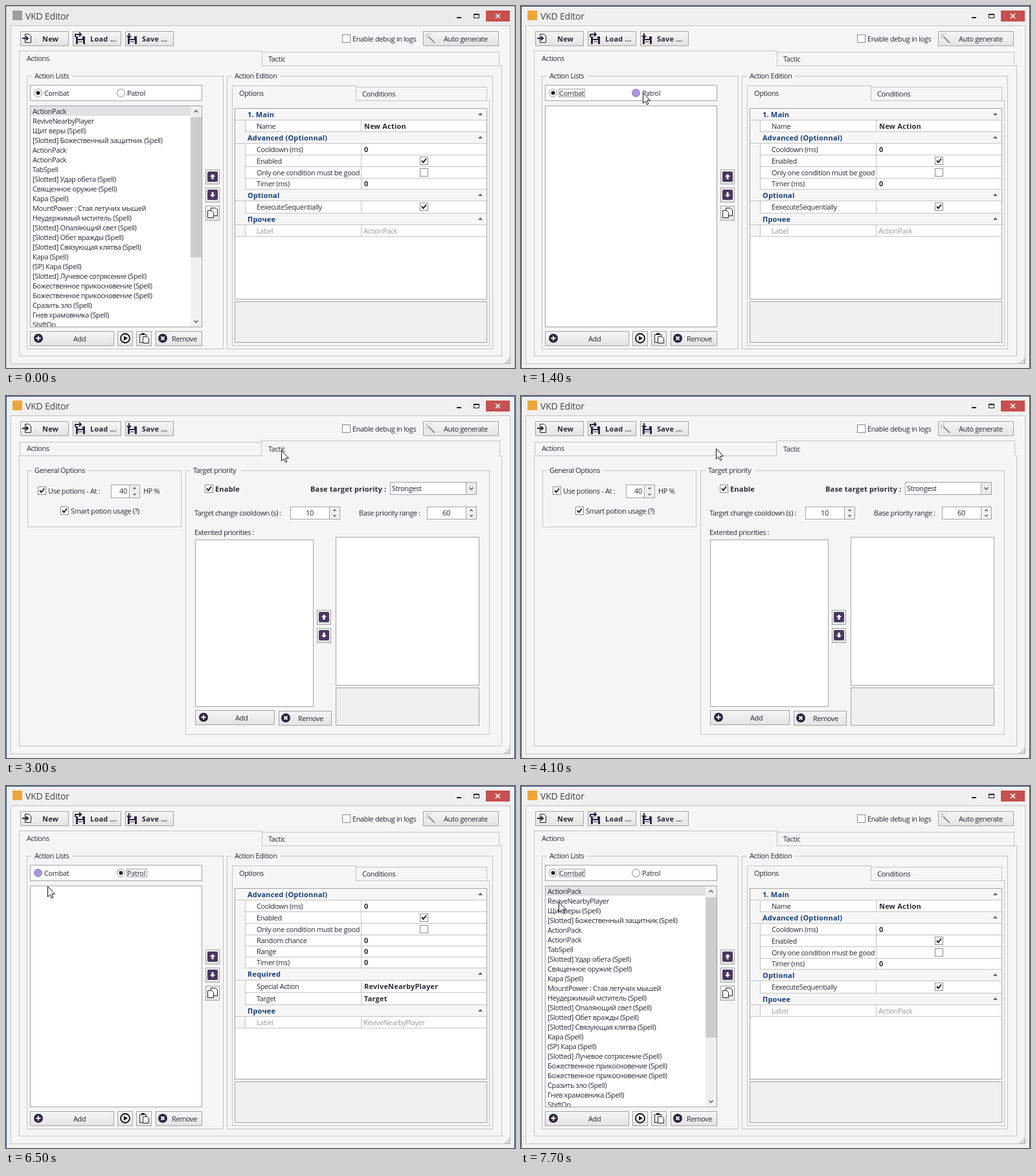
An HTML page with a canvas for the animation above (8000 ms loop, 786 px wide and 560 px high).

```html
<!DOCTYPE html>
<html lang="en">
<head>
<meta charset="utf-8">
<title>Action editor</title>
<style>
html, body { margin: 0; width: 100%; height: 100%; overflow: hidden; background: #ebebeb; }
canvas { display: block; width: 786px; height: 560px; }
</style>
</head>
<body>
<canvas id="stage" width="786" height="560"></canvas>
<script>
const ctx = document.getElementById('stage').getContext('2d');
const LOOP = 8000;
const FACE = '"Open Sans", "Noto Sans", sans-serif';
const BG = '#f5f5f5', LINE = '#c3c3c3', EDGE = '#a3a3a3', INK = '#2b2833', PLUM = '#2f2440', NAVY = '#163f7e';

const combatList = [
  'ActionPack', 'ReviveNearbyPlayer', 'Щит веры (Spell)', '[Slotted] Божественный защитник (Spell)',
  'ActionPack', 'ActionPack', 'TabSpell', '[Slotted] Удар обета (Spell)', 'Священное оружие (Spell)',
  'Кара (Spell)', 'MountPower : Стая летучих мышей', 'Неудержимый мститель (Spell)',
  '[Slotted] Опаляющий свет (Spell)', '[Slotted] Обет вражды (Spell)', '[Slotted] Связующая клятва (Spell)',
  'Кара (Spell)', '(SP) Кара (Spell)', '[Slotted] Лучевое сотрясение (Spell)',
  'Божественное прикосновение (Spell)', 'Божественное прикосновение (Spell)',
  'Сразить зло (Spell)', 'Гнев храмовника (Spell)', 'ShiftOn'
];
const patrolList = ['ReviveNearbyPlayer', 'UseItemSpecial [Invocation_Random_Buff]', '(SP) Wait'];

// Rows: height, name, value; a missing value marks a category.
const combatGrid = [
  [18, '1. Main'], [18, 'Name', 'New Action'],
  [18, 'Advanced (Optionnal)'], [18, 'Cooldown (ms)', '0'], [18, 'Enabled', true],
  [18, 'Only one condition must be good', false], [17, 'Timer (ms)', '0'],
  [18, 'Optional'], [19, 'EexecuteSequentially', true],
  [18, 'Прочее'], [18, 'Label', 'ActionPack']
];
const patrolGrid = [
  [18, 'Advanced (Optionnal)'], [18, 'Cooldown (ms)', '0'], [18, 'Enabled', true],
  [18, 'Only one condition must be good', false], [17, 'Random chance', '0'], [17, 'Range', '0'],
  [17, 'Timer (ms)', '0'],
  [19, 'Required'], [19, 'Special Action', 'ReviveNearbyPlayer'], [19, 'Target', 'Target'],
  [18, 'Прочее'], [18, 'Label', 'ReviveNearbyPlayer']
];

// Pointer keys: time, x, y
const path = [
  [100, 770, 4], [900, 188, 134], [2100, 188, 134], [2800, 429, 88], [2900, 425, 84],
  [3400, 425, 84], [4100, 301, 81], [4500, 301, 81], [5200, 89, 119], [5400, 66, 133],
  [5800, 66, 133], [6500, 64, 155], [6800, 64, 147], [6900, 64, 147], [7700, 58, 179]
];

function fill(x, y, w, h, color) {
  ctx.fillStyle = color;
  ctx.fillRect(x, y, w, h);
}

function box(x, y, w, h, color, edge = LINE) {
  if (color) fill(x, y, w, h, color);
  ctx.strokeStyle = edge;
  ctx.lineWidth = 1;
  ctx.strokeRect(x + 0.5, y + 0.5, w - 1, h - 1);
}

function text(s, x, y, color = INK, bold = false) {
  ctx.font = (bold ? 'bold ' : '') + '11px ' + FACE;
  ctx.letterSpacing = bold ? '0.2px' : '-0.38px';
  ctx.fillStyle = color;
  ctx.fillText(s, x, y);
}

function poly(points, color, edge) {
  ctx.beginPath();
  points.forEach(([x, y]) => ctx.lineTo(x, y));
  ctx.closePath();
  if (color) { ctx.fillStyle = color; ctx.fill(); }
  if (edge) { ctx.strokeStyle = edge; ctx.lineWidth = 1; ctx.stroke(); }
}

function lines(color, width, ...parts) {
  ctx.strokeStyle = color;
  ctx.lineWidth = width;
  ctx.beginPath();
  for (const p of parts) {
    ctx.moveTo(p[0], p[1]);
    for (let i = 2; i < p.length; i += 2) ctx.lineTo(p[i], p[i + 1]);
  }
  ctx.stroke();
}

function disc(x, y, r, color, edge, width = 1) {
  ctx.beginPath();
  ctx.arc(x, y, r, 0, Math.PI * 2);
  if (color) { ctx.fillStyle = color; ctx.fill(); }
  if (edge) { ctx.strokeStyle = edge; ctx.lineWidth = width; ctx.stroke(); }
}

function button(x, y, w, h) {
  const g = ctx.createLinearGradient(0, y, 0, y + h);
  g.addColorStop(0, '#f6f6f6');
  g.addColorStop(1, '#e3e3e3');
  box(x, y, w, h, g, EDGE);
}

function check(x, y, on) {
  box(x, y, 13, 13, '#fff', '#8b8b8b');
  if (on) lines('#222', 2, [x + 3, y + 6, x + 5.5, y + 9, x + 10, y + 3]);
}

function group(x, y, w, h, label, tx, tw) {
  box(x, y, w, h, BG);
  fill(tx - 4, y, tw + 8, 1, BG);
  text(label, tx, y + 4);
}

function chevron(x, y, dir, r = 3) {
  lines('#666', 1.6, [x - r, y + dir * r / 2, x, y - dir * r / 2, x + r, y + dir * r / 2]);
}

function spin(x, y, w, h, value, tx) {
  box(x, y, w, h, '#fff', EDGE);
  box(x + w - 17, y, 17, h, '#f0f0f0', EDGE);
  chevron(x + w - 8.5, y + 6, 1, 2);
  chevron(x + w - 8.5, y + h - 6, -1, 2);
  text(value, tx, y + 14);
}

function roundIcon(x, y, turn) {
  disc(x, y, 7, PLUM);
  ctx.save();
  ctx.translate(x, y);
  ctx.rotate(turn);
  lines('#fff', 2, [-3.5, 0, 3.5, 0], [0, -3.5, 0, 3.5]);
  ctx.restore();
}

function moveButton(x, y, dir) {
  button(x, y, 22, 23);
  ctx.fillStyle = '#4a3860';
  ctx.beginPath();
  ctx.roundRect(x + 3, y + 3, 16, 16, 2);
  ctx.fill();
  const cx = x + 11, cy = y + 11;
  poly([[cx, cy - 4 * dir], [cx + 4, cy], [cx - 4, cy]], '#fff');
  fill(cx - 1.5, dir > 0 ? cy : cy - 4, 3, 4, '#fff');
}

function floppy(x, y) {
  fill(x, y, 14, 12, PLUM);
  fill(x + 3, y, 7, 4, '#ddd');
  fill(x + 3, y + 6, 8, 6, '#f2f2f2');
  fill(x + 4, y + 8, 6, 1, PLUM);
}

function sheet(x, y, w, h) {
  poly([[x, y], [x + w - 3, y], [x + w, y + 3], [x + w, y + h], [x, y + h]], '#f7f7f7', '#222');
}

function toolbar() {
  button(22, 39, 75, 23);
  button(103, 39, 75, 23);
  button(184, 39, 75, 23);
  sheet(29.5, 43.5, 9, 13);
  lines(PLUM, 2, [25, 50, 34, 50], [31, 47, 34, 50, 31, 53]);
  text('New', 56, 55, INK, true);
  floppy(108, 47);
  lines(PLUM, 2, [107, 48, 107, 44, 115, 44], [113, 41, 116, 44, 113, 47]);
  text('Load ...', 130, 55, INK, true);
  floppy(188, 47);
  lines(PLUM, 2, [190, 42, 190, 48], [187, 46, 190, 49, 193, 46]);
  text('Save ...', 210, 55, INK, true);
  check(519, 44, false);
  text('Enable debug in logs', 535, 55);
  button(644, 39, 117, 23);
  lines('#8f8f8f', 2, [652, 47, 662, 57]);
  lines('#a8a8a8', 1, [648, 43, 651, 46], [652, 42, 652, 45], [647, 47, 650, 47], [655, 44, 657, 42], [649, 51, 651, 49]);
  text('Auto generate', 676, 55);
}

function frame(active) {
  fill(0, 0, 786, 560, active ? '#f0f0f0' : '#ebebeb');
  const edge = active ? '#2b4a8c' : '#b5b5b5';
  fill(0, 0, 786, 1, edge);
  fill(0, 0, 1, 560, edge);
  fill(785, 0, 1, 560, edge);
  fill(10, 7, 15, 15, active ? '#eda63c' : '#9d9d9d');
  ctx.font = '14px ' + FACE;
  ctx.letterSpacing = '-0.2px';
  ctx.fillStyle = '#444';
  ctx.fillText('VKD Editor', 30, 21);
  fill(696, 17, 7, 2, '#222');
  box(722, 12, 9, 7, null, '#222');
  fill(722, 12, 9, 2, '#222');
  fill(741, 7, 37, 17, '#c75050');
  lines('#fff', 1.7, [756, 12, 763, 19], [763, 12, 756, 19]);
  box(7, 30, 772, 524, BG);
  for (let i = 0; i < 3; i++)
    for (let j = 0; j <= i; j++) fill(776 - j * 3, 545 + i * 3, 2, 2, '#b4b4b4');
  toolbar();
}

function mainTabs(tactic) {
  box(20, 92, 746, 450, BG);
  if (tactic) {
    box(21, 71, 374, 22, BG);
    box(394, 69, 369, 24, BG);
    fill(395, 92, 367, 1, BG);
  } else {
    box(395, 71, 367, 22, BG);
    box(20, 69, 376, 24, BG);
    fill(21, 92, 374, 1, BG);
  }
  text('Actions', 32, 85);
  text('Tactic', 405, 86);
}

function radio(x, label, on, hot, focus, w) {
  disc(x + 6.5, 134.5, 6, hot ? '#a997dc' : '#fff', hot ? '#8f7fc0' : '#8b8b8b');
  if (on) disc(x + 6.5, 134.5, 3, '#222');
  text(label, x + 16, 139);
  if (focus) {
    ctx.setLineDash([1, 1]);
    box(x + 15, 128, w, 13, null, '#333');
    ctx.setLineDash([]);
  }
}

function actionList(items) {
  box(37, 154, 266, 343, '#fff', EDGE);
  const long = items.length > 22;
  ctx.save();
  ctx.beginPath();
  ctx.rect(38, 155, 264, 341);
  ctx.clip();
  items.forEach((s, i) => {
    if (!i) fill(38, 155, long ? 247 : 264, 15, '#e2e2e4');
    text(s, 41, 167 + i * 15);
  });
  if (long) {
    fill(285, 155, 17, 341, '#f0f0f0');
    fill(285, 172, 17, 217, '#cdcdcd');
    chevron(293.5, 163, 1);
    chevron(293.5, 488, -1);
  }
  ctx.restore();
}

function propertyGrid(rows) {
  box(353, 158, 390, 296, '#fff', EDGE);
  let y = 159;
  for (const [h, name, value] of rows) {
    const mid = Math.floor(y + h / 2), base = mid + 4;
    if (value === undefined) {
      fill(354, y, 388, h, '#f6f6f6');
      text(name, 373, base, NAVY, true);
      poly([[729, mid + 1], [732.5, mid - 3], [736, mid + 1]], '#666');
    } else {
      const dim = name === 'Label';
      fill(354, y, 15, h, '#f6f6f6');
      fill(369, y - 1, 1, h + 1, LINE);
      fill(548, y - 1, 1, h + 1, LINE);
      text(name, 387, base, dim ? '#9a9a9a' : INK);
      if (typeof value === 'boolean') check(639, mid - 7, value);
      else text(value, dim ? 552 : 553, base, dim ? '#9a9a9a' : INK, !dim);
    }
    y += h;
    fill(value === undefined ? 354 : 369, y - 1, value === undefined ? 388 : 373, 1, LINE);
  }
  fill(354, y - 1, 388, 1, LINE);
}

function actionsPage(s) {
  group(32, 108, 304, 423, 'Action Lists', 44, 54);
  box(37, 122, 266, 25, '#fff', EDGE);
  radio(43, 'Combat', !s.patrol, s.hot === 'combat', s.focus === 'combat', 41);
  radio(171, 'Patrol', s.patrol, s.hot === 'patrol', s.focus === 'patrol', 32);
  actionList(s.empty ? [] : s.patrol ? patrolList : combatList);

  button(37, 503, 130, 23);
  roundIcon(50, 514, 0);
  text('Add', 104, 519);
  button(172, 503, 24, 23);
  disc(184, 514, 7, null, '#111', 1.8);
  poly([[182, 510.5], [188, 514], [182, 517.5]], '#111');
  button(201, 503, 24, 23);
  box(206, 508, 11, 13, '#f7f7f7', '#222');
  fill(209, 506, 5, 3, '#222');
  sheet(211.5, 511.5, 9, 10);
  button(231, 503, 72, 23);
  roundIcon(242, 514, Math.PI / 4);
  text('Remove', 256, 519);

  moveButton(308, 253, 1);
  moveButton(308, 281, -1);
  button(308, 309, 22, 23);
  sheet(316.5, 312.5, 10, 12);
  sheet(311.5, 316.5, 9, 11);

  group(341, 108, 411, 423, 'Action Edition', 353, 66);
  box(349, 146, 398, 380, BG);
  box(540, 125, 203, 22, BG);
  box(349, 123, 192, 24, BG);
  fill(350, 146, 190, 1, BG);
  text('Options', 360, 139);
  text('Conditions', 550, 140);
  propertyGrid(s.patrol ? patrolGrid : combatGrid);
  box(353, 457, 390, 64, '#f0f0f0', EDGE);
}

function tacticPage() {
  group(33, 115, 238, 88, 'General Options', 44, 78);
  check(49, 140, true);
  text('Use potions - At :', 65, 151);
  spin(162, 137, 45, 21, '40', 175);
  text('HP %', 212, 151);
  check(84, 171, true);
  text('Smart potion usage (?)', 100, 182);

  group(277, 115, 470, 409, 'Target priority', 289, 69);
  check(307, 137, true);
  text('Enable', 323, 148, INK, true);
  text('Base target priority :', 470, 148, INK, true);
  box(593, 133, 134, 20, '#fff', EDGE);
  box(710, 133, 17, 20, '#ebebeb', EDGE);
  chevron(718.5, 143, -1);
  text('Strongest', 596, 147);
  text('Target change cooldown (s) :', 291, 185);
  spin(439, 171, 77, 20, '10', 463);
  text('Base priority range :', 545, 185);
  spin(650, 171, 77, 20, '60', 674);
  text('Extented priorities :', 291, 215);
  box(292, 222, 183, 259, '#fff', EDGE);
  box(509, 218, 222, 230, '#fff', EDGE);
  box(509, 451, 222, 59, '#efefef', EDGE);
  moveButton(480, 331, 1);
  moveButton(480, 359, -1);
  button(292, 486, 123, 23);
  roundIcon(305, 497, 0);
  text('Add', 354, 502);
  button(421, 487, 82, 23);
  roundIcon(432, 498, Math.PI / 4);
  text('Remove', 451, 503);
}

function pointer(t) {
  if (t < path[0][0]) return;
  let i = 0;
  while (i < path.length - 2 && t >= path[i + 1][0]) i++;
  const [t0, x0, y0] = path[i], [t1, x1, y1] = path[i + 1];
  const u = Math.min(1, (t - t0) / (t1 - t0));
  const e = (u + u * u * (3 - 2 * u)) / 2;
  ctx.save();
  ctx.translate(Math.round(x0 + (x1 - x0) * e) + 0.5, Math.round(y0 + (y1 - y0) * e) + 0.5);
  poly([[0, 0], [0, 16], [3.6, 12.6], [6, 18], [8.4, 17], [6, 11.6], [11, 11.6]], '#fff', '#111');
  ctx.restore();
}

function stateAt(t) {
  const within = (a, b) => t >= a && t < b;
  return {
    active: t >= 1300,
    tactic: within(3000, 4200),
    patrol: within(1500, 6700),
    empty: within(1400, 1500) || within(5600, 6700),
    hot: within(900, 2300) ? 'patrol' : within(5300, 6700) ? 'combat' : '',
    focus: within(1300, 1500) || t >= 6700 ? 'combat'
      : within(1500, 4200) || within(5500, 6700) ? 'patrol' : ''
  };
}

function draw(now) {
  const t = Math.floor((now % LOOP) / 100) * 100;
  const s = stateAt(t);
  frame(s.active);
  mainTabs(s.tactic);
  if (s.tactic) tacticPage();
  else actionsPage(s);
  pointer(t);
}

let start;
function tick(now) {
  start ??= now;
  draw(now - start);
  requestAnimationFrame(tick);
}
draw(0);
requestAnimationFrame(tick);
</script>
</body>
</html>
```
